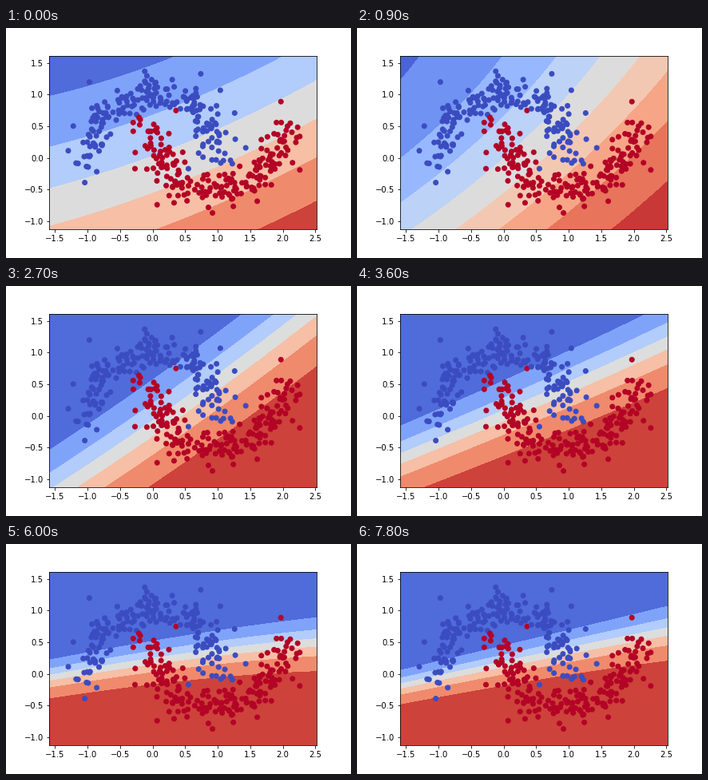
Animation of 432x288 px, one loop 8 s. Source, as a matplotlib script:

```python
import numpy as np
import matplotlib.pyplot as plt
from matplotlib.animation import FuncAnimation

W, H = 432, 288
XLIM, YLIM = (-1.5875, 2.5164), (-1.128, 1.618)
LEFT, RIGHT, TOP, BOTTOM = 54, 388.8, 34.56, 252
FRAMES, INTERVAL, HOLD = 80, 100, 3


def moon(rng, center, sign, strays, count=192):
    """Half circle of evenly spread points with noise, plus a few strays."""
    t = np.linspace(0, np.pi, count)
    arc = np.array(center)[:, None] + sign * np.array([np.cos(t), np.sin(t)])
    noise = np.clip(rng.normal(0, .135, arc.shape), -.3, .3)
    return np.hstack([arc + noise, np.array(strays).T])


def basis(px, py):
    u, v = (px - 221) / 168, (py - 143) / 108
    return np.stack([np.ones_like(u), u, v, u * u, u * v, v * v])


def fit(contours, terms=5):
    """Polynomial logit that follows a few probability contours (pixels)."""
    rows = [(x, y, np.log(p / (1 - p)))
            for p, points in contours.items() for x, y in points]
    x, y, logit = np.array(rows, float).T
    coef = np.zeros(6)
    coef[:terms] = np.linalg.lstsq(basis(x, y)[:terms].T, logit, rcond=None)[0]
    return coef


def strip(lefts, rights, bow):
    """Slightly arched contours that run from the left to the right edge."""
    return fit({p: [(54, a), (221, (a + b) / 2 - bow), (389, b)]
                for p, a, b in zip((.15, .5, .9), lefts, rights)})


KEYS = {
    0: fit({.3: [(54, 92), (148, 71), (212, 36)],
            .4: [(54, 141), (322, 36)],
            .5: [(54, 190), (221, 144), (389, 67)],
            .6: [(76, 252), (389, 125)],
            .8: [(313, 252), (389, 213)]}, terms=6),
    3: fit({.2: [(54, 58), (79, 36)],
            .3: [(54, 165), (199, 36)],
            .5: [(69, 252), (288, 36)],
            .7: [(178, 252), (389, 62)],
            .9: [(321, 252), (389, 190)]}, terms=6),
    5: fit({.12: [(54, 187), (223, 36)],
            .48: [(105, 252), (337, 36)],
            .84: [(218, 252), (389, 106)]}),
    9: fit({.15: [(54, 205), (297, 36)],
            .45: [(62, 252), (362, 36)],
            .9: [(178, 252), (389, 102)]}),
    16: strip((157, 181, 219), (68, 106, 149), 3),
    20: strip((146, 166, 194), (92, 123, 159), 4),
    26: strip((159, 177, 201), (76, 114, 143), 1),
}


def coefficients(step):
    return np.array([np.interp(step, list(KEYS), column)
                     for column in np.array(list(KEYS.values())).T])


def band_levels(step):
    """Level spacing widens as the predictions grow more certain."""
    if step < 4:
        size, first, last = .1, 1 + (step == 0), 9 + (step == 3)
    elif step < 6:
        size, first, last = .12, 0, 8
    else:
        size, first, last = .15, 0, 7
    return size * np.arange(first, last + 1)


rng = np.random.default_rng(4)
blue = moon(rng, (0, 0), 1, [
    (-1.04, -.39), (.74, 1.33), (1.04, 1.07), (1.26, .71),
    (1.43, .16), (.55, -.17), (-.97, 1.2), (-.12, 1.37)])
red = moon(rng, (1, .5), -1, [
    (1.97, .89), (2.26, .34), (2.26, -.19), (.07, -.74),
    (.33, -.71), (.36, .75), (-.27, -.17), (.92, -.87)])
points = np.hstack([blue, red])
labels = np.repeat([0, 1], [blue.shape[1], red.shape[1]])
order = rng.permutation(labels.size)

plt.rcParams["font.family"] = "DejaVu Sans"
fig, ax = plt.subplots(figsize=(W / 72, H / 72), dpi=72)
fig.subplots_adjust(left=.125, right=.9, top=.88, bottom=.125)
ax.set(xlim=XLIM, ylim=YLIM)
ax.scatter(*points[:, order], c=labels[order], cmap="coolwarm", zorder=2)

columns, rows = 168, 110
grid = np.meshgrid(np.linspace(*XLIM, columns), np.linspace(*YLIM, rows))
grid_basis = basis(*np.meshgrid(np.linspace(LEFT, RIGHT, columns),
                                np.linspace(BOTTOM, TOP, rows)))
shown = []


def draw(frame):
    step = frame // HOLD
    while shown:
        shown.pop().remove()
    logit = np.tensordot(coefficients(step), grid_basis, 1)
    levels = band_levels(step)
    prob = np.clip(1 / (1 + np.exp(-logit)), levels[0] + 1e-6, levels[-1] - 1e-6)
    shown.append(ax.contourf(*grid, prob, levels=levels, cmap="coolwarm",
                             vmin=levels[0], vmax=levels[-1], zorder=1))
    return shown


anim = FuncAnimation(fig, draw, frames=FRAMES, interval=INTERVAL,
                     init_func=lambda: [], repeat=True, repeat_delay=0)
plt.show()
```
